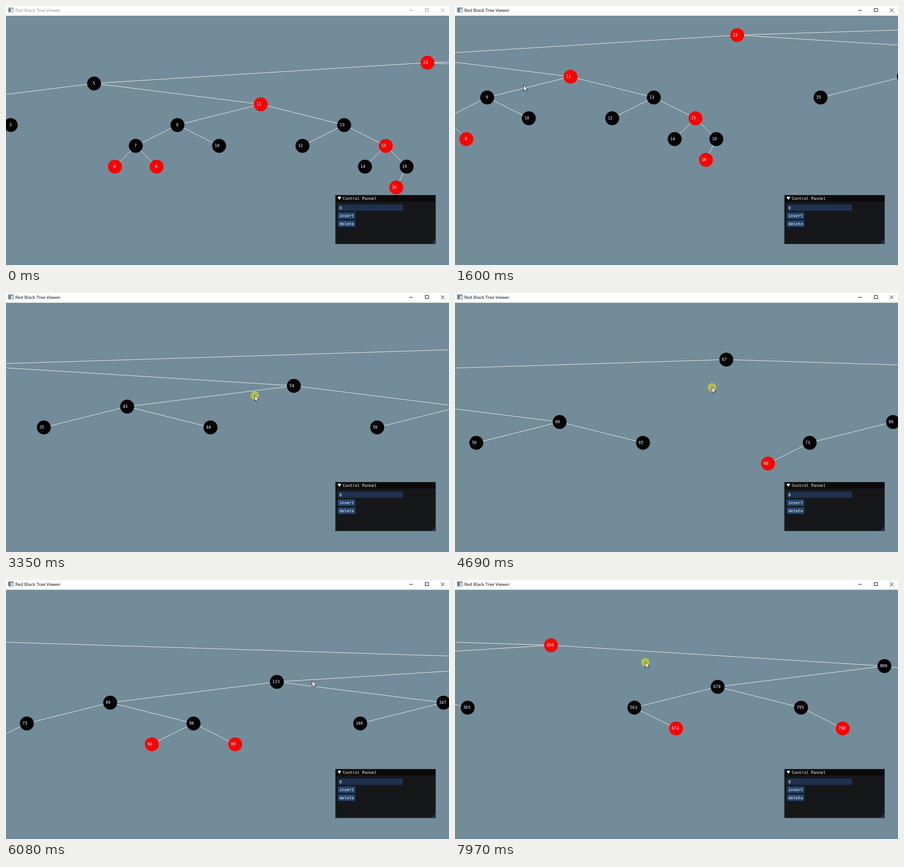
An HTML page with a canvas that plays this animation: 978x573 px, repeating every 8000 ms.

```html
<!DOCTYPE html>
<html lang="en">
<head>
<meta charset="utf-8">
<title>Red Black Tree Viewer</title>
<style>
html, body { margin: 0; overflow: hidden; background: #738c99; }
canvas { display: block; }
</style>
</head>
<body>
<canvas id="stage" width="978" height="573"></canvas>
<script>
const ctx = document.getElementById('stage').getContext('2d');
const LOOP = 8000, FIRST = 257, STEP = 70.1;
const MONO = '8.9px "DejaVu Sans Mono", monospace';
const TITLE = '9.8px "Open Sans", sans-serif';

// Inserting the keys in this order gives the tree its shape; * marks red.
const keys = `67 23* 450* 5 54 123 800 2 11* 43 60 89 347 678 900
  3 9 13 35 44 56 65 73 98 346 365 563 795
  7 10 12 15* 68* 94* 99* 674* 798* 6* 8* 14 19 16*`;

// The mouse drags the tree: press and release step, both ends, sideways bow.
const ENTRY = { press: 4, release: 4, x0: 540, y0: 545, x1: 540, y1: 545, bow: 0 };
const strokes = [ENTRY, ...[
  [9, 19, 458.5, 236, 151, 175, 85],
  [24, 30, 640, 172, 295, 173, 5],
  [36, 52, 927.5, 132, 170.5, 300, 10],
  [58, 68, 961, 248, 173, 135, 16.5],
  [70, 76, 497, 206, 154, 265, -39.6],
  [86, 98, 811, 212, 87, 105, 8.5],
  [104, 116, 818, 109, 22, 253, 0]
].map(([press, release, x0, y0, x1, y1, bow]) => ({ press, release, x0, y0, x1, y1, bow }))];

const nodes = [];
for (const key of keys.split(/\s+/)) {
  const node = { value: parseInt(key), red: key.endsWith('*'), x: 0, y: 0 };
  let dx = 1472, at = nodes[0];
  while (at) {
    const side = node.value < at.value ? 'left' : 'right';
    node.x += side === 'left' ? -dx : dx;
    node.y += 46;
    dx /= 2;
    node.parent = at;
    if (!at[side]) {
      at[side] = node;
      break;
    }
    at = at[side];
  }
  nodes.push(node);
}

function glide(x0, y0, x1, y1, u, bow) {
  const ease = (1 - Math.cos(Math.PI * u)) / 2;
  return [x0 + (x1 - x0) * ease, y0 + (y1 - y0) * ease + bow * Math.sin(Math.PI * u)];
}

// Mouse place, button and tree root at a step.
function stateAt(step) {
  const root = [2402.5, 79.3];
  let mouse = null, pressed = false, last = null;
  for (const s of strokes) {
    if (step < s.press) {
      if (last) {
        const u = (step - last.release) / (s.press - last.release);
        mouse = glide(last.x1, last.y1, s.x0, s.y0, u, 0);
      }
      break;
    }
    const u = s === ENTRY ? 1 : Math.min(1, (step - s.press) / (s.release - s.press));
    mouse = glide(s.x0, s.y0, s.x1, s.y1, u, s.bow);
    root[0] += mouse[0] - s.x0;
    root[1] += mouse[1] - s.y0;
    pressed = step < s.release;
    if (pressed) break;
    last = s;
  }
  return { root, mouse, pressed };
}

function rect(x, y, w, h, color) {
  ctx.fillStyle = color;
  ctx.fillRect(x, y, w, h);
}

function shape(points, fill, stroke) {
  ctx.beginPath();
  points.forEach(([x, y]) => ctx.lineTo(x, y));
  ctx.closePath();
  ctx.fillStyle = fill;
  ctx.fill();
  if (stroke) {
    ctx.strokeStyle = stroke;
    ctx.stroke();
  }
}

function disc(x, y, r, color) {
  ctx.beginPath();
  ctx.arc(x, y, r, 0, Math.PI * 2);
  ctx.fillStyle = color;
  ctx.fill();
}

function line(x1, y1, x2, y2, color) {
  ctx.beginPath();
  ctx.moveTo(x1, y1);
  ctx.lineTo(x2, y2);
  ctx.strokeStyle = color;
  ctx.stroke();
}

function text(str, x, y, color = '#fff', font = MONO) {
  ctx.font = font;
  ctx.fillStyle = color;
  ctx.fillText(str, x, y);
}

function drawTree([rx, ry]) {
  ctx.lineWidth = 0.9;
  for (const { x, y, parent } of nodes)
    if (parent) line(rx + parent.x, ry + parent.y, rx + x, ry + y, '#fff');
  for (const { value, red, x, y } of nodes) {
    disc(rx + x, ry + y, 15.4, red ? '#f00' : '#000');
    text(value, rx + x - (value < 10 ? 3.2 : 9.8), ry + y + 2.8);
  }
}

function drawTitleBar(active) {
  const ink = active ? '#000' : '#8c8c8c';
  rect(0, 0, 978, 21.5, '#fff');
  rect(4.5, 3.5, 12, 10.5, active ? '#596873' : '#858e94');
  rect(5.5, 5.5, 10, 7.5, '#f4f6f7');
  rect(6, 6, 5, 6.5, '#4f8190');
  rect(12, 6.5, 3, 1, '#a5b0b7');
  rect(12, 9, 3, 1, '#a5b0b7');
  text('Red Black Tree Viewer', 20.5, 13.2, ink, TITLE);
  ctx.lineWidth = 1;
  line(890, 9.5, 898, 9.5, ink);
  ctx.strokeRect(925.5, 5.5, 7, 7);
  line(960, 5.5, 968, 13.5, ink);
  line(968, 5.5, 960, 13.5, ink);
}

function drawPanel() {
  rect(727, 418, 221.5, 108.5, '#151718');
  rect(727, 418, 221.5, 14.5, '#0a0a0a');
  ctx.lineWidth = 0.8;
  ctx.strokeStyle = '#44484f';
  ctx.strokeRect(727.2, 418.3, 221.2, 108.2);
  shape([[732, 422], [740, 422], [736, 429.3]], '#fff');
  text('Control Pannel', 743.5, 429);
  rect(732.5, 439, 144, 14.3, '#20314e');
  text('0', 736, 449.8);
  ['insert', 'delete'].forEach((label, i) => {
    rect(732.5, 456.7 + i * 17.6, 38.7, 14.3, '#23456d');
    text(label, 736, 467.4 + i * 17.6);
  });
  shape([[948, 516], [948, 526], [938, 526]], '#20304a');
}

function drawMouse([x, y], pressed) {
  if (pressed) disc(x + 0.3, y + 0.8, 9.5, '#b2bd51');
  const arrow = [[0, 0], [0, 13], [3, 10.2], [5.3, 15], [7.4, 14], [5.2, 9.5], [9, 9.4]];
  ctx.lineWidth = 0.9;
  shape(arrow.map(([px, py]) => [x + 0.3 + px, y + py]), '#fff', '#111');
}

function draw(time) {
  const step = Math.floor((time % LOOP - FIRST) / STEP);
  const { root, mouse, pressed } = stateAt(step);
  rect(0, 0, 978, 573, '#738c99');
  drawTree(root);
  drawTitleBar(step >= strokes[1].press);
  drawPanel();
  if (mouse) drawMouse(mouse, pressed);
}

const start = performance.now();
function tick() {
  draw(performance.now() - start);
  requestAnimationFrame(tick);
}
tick();
</script>
</body>
</html>
```
